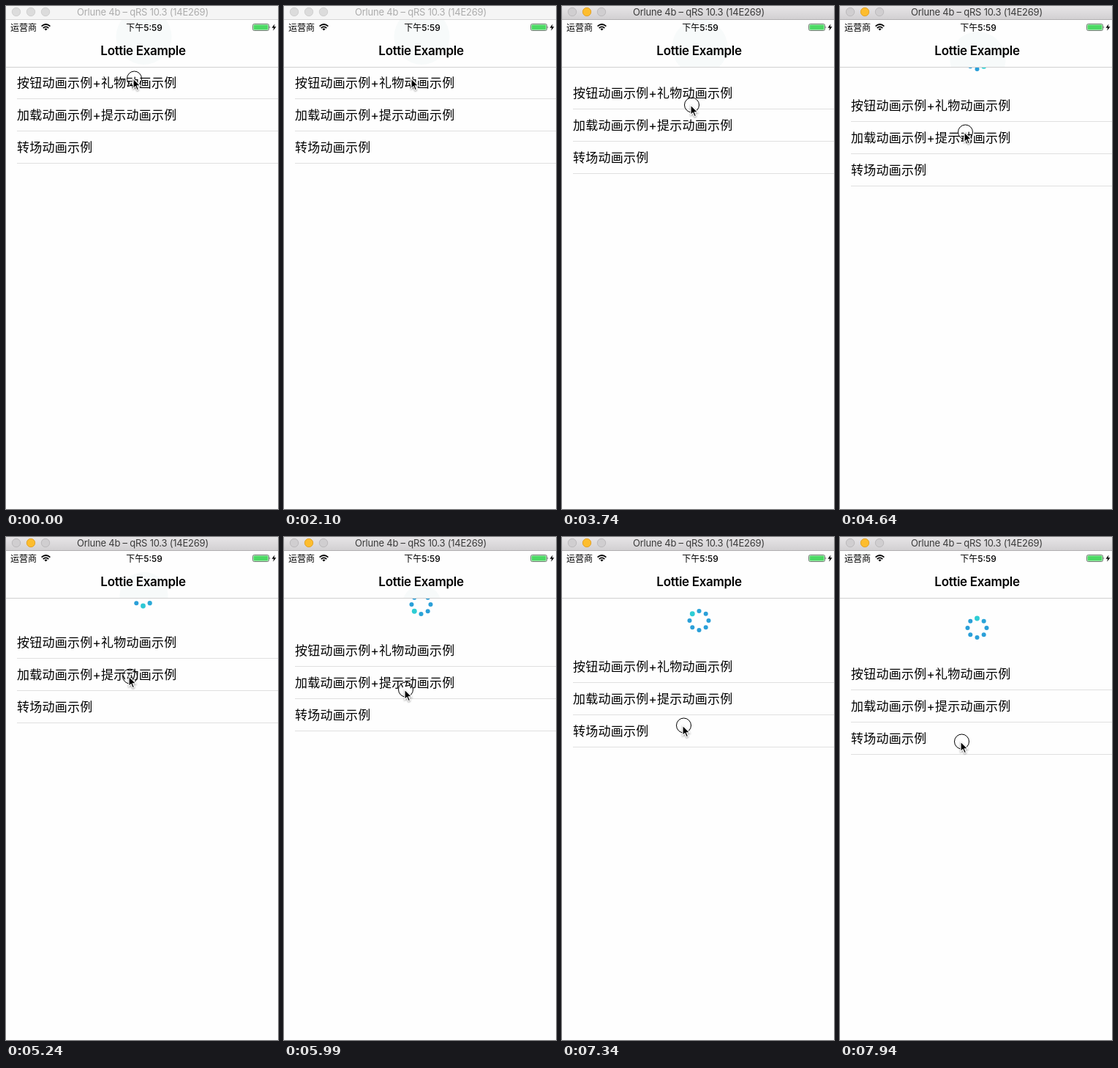
Write an HTML page that moves like this. It is 372x686 px and loops after 8000 ms.

```html
<!DOCTYPE html>
<html lang="zh">
<head>
<meta charset="utf-8">
<style>
  html, body { margin: 0; height: 100%; overflow: hidden; background: #fefefe; }
  svg { display: block; }
  text { font-family: Inter, "Noto Sans CJK SC", "Noto Sans CJK", sans-serif; fill: #000; }
  .mid { text-anchor: middle; }
  #caption { font-size: 13px; letter-spacing: -.23px; }
  .status { font-size: 12px; }
  .clock { font-weight: 500; }
  .heading { font-size: 17px; font-weight: 600; letter-spacing: -.32px; }
  #list text { font-size: 17px; letter-spacing: .24px; }
  #arrow { filter: drop-shadow(0 1px 1px rgba(0, 0, 0, .4)); }
</style>
</head>
<body>
<svg width="372" height="686" viewBox="0 0 372 686">
  <defs>
    <linearGradient id="chrome" x2="0" y2="1">
      <stop stop-color="#e7e5e7"/><stop offset="1" stop-color="#d2d0d2"/>
    </linearGradient>
    <clipPath id="navClip"><path d="M0 19H372V83H0z"/></clipPath>
  </defs>

  <g id="list"></g>
  <g id="spinner"></g>

  <path d="M0 19H372V83H0z" fill="#fefefe"/>
  <g clip-path="url(#navClip)"><circle id="halo" cx="188.5" fill="#3c8c98" opacity=".035"/></g>
  <path d="M0 83.5H372" stroke="#d0d0d0"/>
  <text class="mid heading" x="187.5" y="67">Lottie Example</text>

  <text class="status" x="6" y="34">运营商</text>
  <g fill="none" stroke="#000" stroke-width="1.7">
    <path d="M48.6 27.6Q54.5 22.4 60.4 27.6M50.7 30.1Q54.5 26.8 58.3 30.1"/>
    <path d="M52.4 31.3Q54.5 29.6 56.6 31.3L54.5 33.6z" fill="#000" stroke="none"/>
  </g>
  <text class="mid status clock" x="189" y="34">下午5:59</text>
  <rect x="337.5" y="24.5" width="22" height="9" rx="2" fill="#fefefe" stroke="#4a5a4c" stroke-width=".8"/>
  <rect x="338.5" y="25.5" width="20" height="7" rx="1" fill="#4cd964"/>
  <path d="M360.6 27.4q1.5 1.6 0 3.2z" fill="#333"/>
  <path d="M367.5 24.5L363.5 29.8H366.2L365.2 33.8L369.5 28.3H366.7z"/>

  <rect id="bar" width="372" height="18"/>
  <path id="barEdge" d="M0 18.5H372"/>
  <g id="buttons"></g>
  <text id="caption" class="mid" x="187" y="13">Orlune 4b – qRS 10.3 (14E269)</text>

  <g id="cursor">
    <circle id="press" cx="1.5" cy="0" r="10" fill="none" stroke="#000"/>
    <path id="arrow" d="M0 0V13.6L3 10.8L5.2 15.8L7.5 14.8L5.4 9.9H9.8z" stroke="#fff" stroke-width="1.2"/>
  </g>
</svg>

<script>
const LOOP = 8000, STEP = 150, WAKE = 2100, PRESS = 2250, DRAG = 3140;
const BLUE = [42, 159, 216], TEAL = [46, 210, 212];

// time, list offset, pointer x, pointer y
const KEYS = [
  [2100, 0, 174, 99], [2600, 0, 174, 104], [3140, 7, 175, 118],
  [3740, 14, 176, 135], [4190, 22, 173, 153], [4640, 31, 170, 172],
  [5240, 39, 167.5, 190], [5990, 50, 165, 208], [6290, 55, 164.5, 218],
  [6740, 61, 164, 232], [7340, 72, 164.5, 257], [7940, 82, 165, 279]
];

const $ = id => document.getElementById(id);

function add(parent, tag, attrs, text = '') {
  const el = document.createElementNS('http://www.w3.org/2000/svg', tag);
  set(el, attrs);
  el.textContent = text;
  return parent.appendChild(el);
}

function set(el, attrs) {
  for (const name in attrs) el.setAttribute(name, attrs[name]);
}

const mix = (a, b, k) => a + (b - a) * k;

['按钮动画示例+礼物动画示例', '加载动画示例+提示动画示例', '转场动画示例'].forEach((label, i) => {
  add($('list'), 'text', { x: 15, y: 110.5 + 44 * i }, label);
  add($('list'), 'path', { d: `M15 ${126.5 + 44 * i}H372`, stroke: '#e0e0e0' });
});

const buttons = [14, 34, 54].map(cx => add($('buttons'), 'circle', { cx, cy: 8, r: 5.7 }));
const dots = Array.from({ length: 8 }, (_, i) => add($('spinner'), 'circle', {
  cx: 13 * Math.cos(i * Math.PI / 4), cy: 13 * Math.sin(i * Math.PI / 4)
}));

function sample(t) {
  const i = KEYS.findIndex(key => key[0] > t);
  if (i < 0) return KEYS.at(-1);
  if (i === 0) return KEYS[0];
  const a = KEYS[i - 1], b = KEYS[i], k = (t - a[0]) / (b[0] - a[0]);
  return a.map((v, j) => mix(v, b[j], k));
}

function snap(t) {
  const base = t < DRAG ? WAKE : DRAG;
  return base + Math.floor((t - base) / STEP) * STEP;
}

function drawWindow(active) {
  set($('bar'), { fill: active ? 'url(#chrome)' : '#f5f5f5' });
  set($('barEdge'), { stroke: active ? '#b1afb1' : '#d6d6d6' });
  $('caption').style.fill = active ? '#3a3a3a' : '#acacac';
  buttons.forEach((button, i) => set(button, active && i === 1
    ? { fill: '#fdbd2e', stroke: '#e2a32a' }
    : { fill: active ? '#d0ced0' : '#dcdcdc', stroke: active ? '#bcbabc' : '#d0d0d0' }));
}

function drawSpinner(offset) {
  const y = 42 + offset, lead = 1 + (offset - 31) / 10;
  set($('spinner'), { transform: `translate(187.5 ${y})` });
  set($('halo'), { cy: y, r: 38 - Math.max(0, offset - 31) * 0.6 });
  dots.forEach((dot, i) => {
    const glow = Math.max(0, 1 - Math.abs(i - lead));
    set(dot, {
      r: 3 + 0.5 * glow,
      fill: `rgb(${BLUE.map((v, j) => mix(v, TEAL[j], glow))})`
    });
  });
}

function draw(t) {
  const [, rawOffset, x, y] = sample(snap(t));
  const offset = Math.round(rawOffset), dragging = t >= PRESS;
  drawWindow(dragging);
  drawSpinner(offset);
  set($('list'), { transform: `translate(0 ${offset})` });
  set($('cursor'), { transform: `translate(${Math.round(x)} ${Math.round(y)})` });
  set($('press'), { visibility: dragging || t < STEP ? 'visible' : 'hidden' });
}

const start = performance.now();
function tick() {
  draw((performance.now() - start) % LOOP);
  requestAnimationFrame(tick);
}
tick();
</script>
</body>
</html>
```
